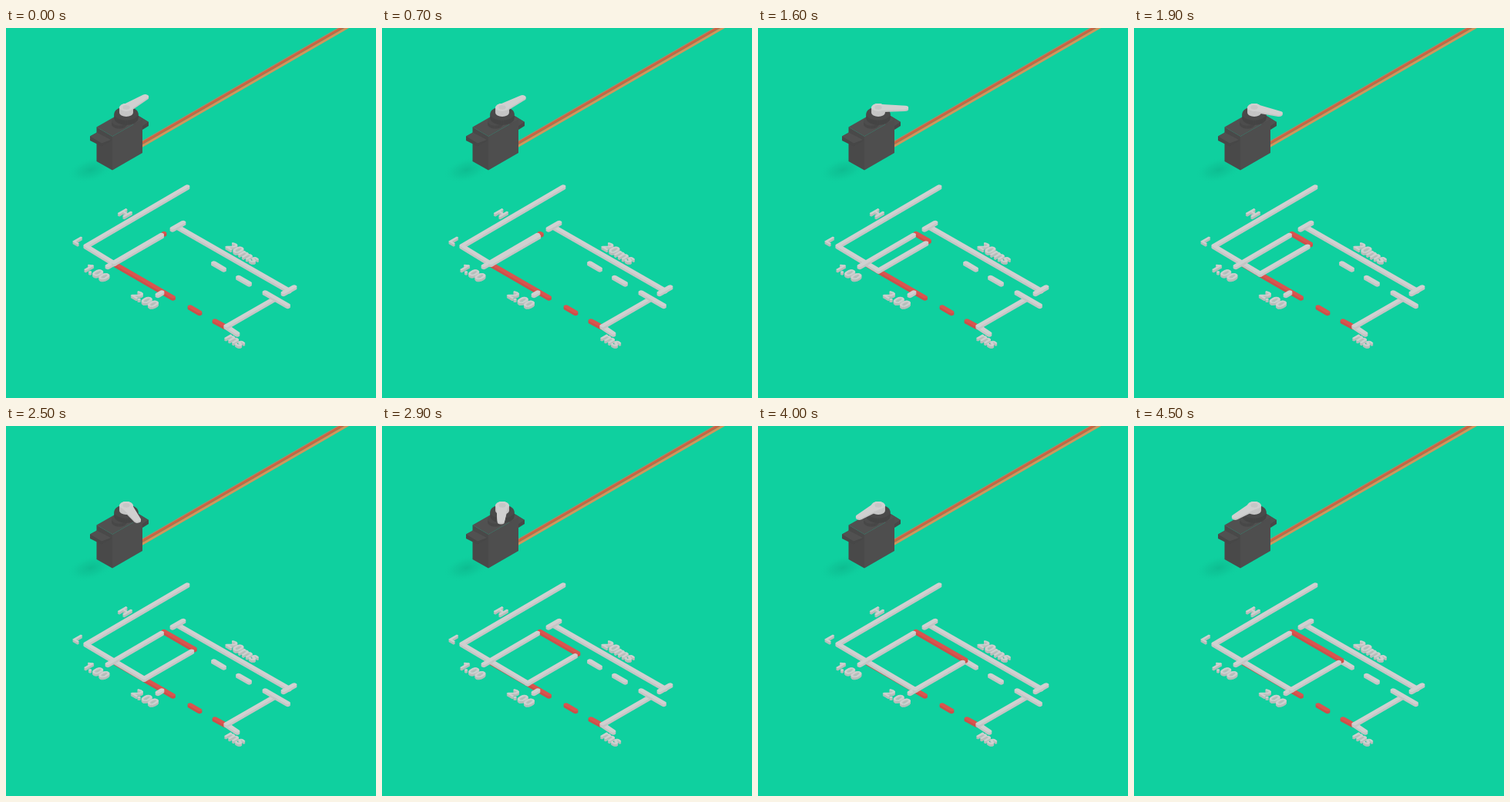
Recreate the animation shown at these times as an HTML page. Size 480 px wide and 480 px high, loop 4600 ms.

```html
<!DOCTYPE html>
<html lang="en">
<head>
<meta charset="utf-8">
<title>Servo pulse width</title>
<style>
  html, body { margin: 0; width: 100%; height: 100%; overflow: hidden; background: #0fd09f; }
  svg { display: block; width: 100vw; height: 100vh; }
  text { font: 600 16.5px "Open Sans", "Noto Sans", sans-serif; stroke-width: .9; stroke-linejoin: round; }
</style>
</head>
<body>
<svg viewBox="0 0 480 480">
  <defs>
    <radialGradient id="shade">
      <stop offset="0" stop-color="#0cb088" stop-opacity=".6"/>
      <stop offset=".5" stop-color="#0dbd91" stop-opacity=".4"/>
      <stop offset="1" stop-color="#0fd09f" stop-opacity="0"/>
    </radialGradient>
  </defs>
  <rect width="480" height="480" fill="#0fd09f"/>
  <ellipse cx="110" cy="184" rx="32" ry="16" fill="url(#shade)" transform="rotate(-15 110 184)"/>
  <g id="cable" fill="none"></g>
  <g id="servo"></g>
  <g id="horn"></g>
  <g id="chart"></g>
</svg>
<script>
const LOOP = 4600, STEP = 100;
const GRAY = ['#c5c5c5', '#d0d0d0'];
const RED = ['#cb504a', '#d9544f'];
const C = Math.sqrt(3) / 2;
const layer = id => document.getElementById(id);

// Repeat a shape downwards to give it height; the last copy is the top face.
function extrude(height, [side, top], shape) {
  let out = '';
  for (let dy = height; dy >= 0; dy--) out += shape(dy, dy ? side : top);
  return out;
}

// Screen point to ground plane coordinates.
const ground = (x, y) => [x / C / 2 - y, x / C / 2 + y];

function bar(x1, y1, x2, y2, colors = GRAY) {
  const [u1, v1] = ground(x1, y1), [u2, v2] = ground(x2, y2);
  return extrude(3, colors, (dy, color) =>
    `<path d="M${u1} ${v1}L${u2} ${v2 + 0.001}" stroke="${color}" stroke-width="5.3" stroke-linecap="round"
      transform="matrix(${C} -.5 ${C} .5 0 ${dy - 1.8})"/>`);
}

function label(x, y, text) {
  return extrude(3, ['#b9bdbb', '#d0d0d0'], (dy, color) =>
    `<text fill="${color}" stroke="${color}" transform="matrix(${C} .5 ${-C} .5 ${x} ${y + dy - 0.5})">${text}</text>`);
}

const poly = (points, color) => `<polygon points="${points}" fill="${color}"/>`;

function cylinder(x, y, rx, height, colors) {
  return extrude(height, colors, (dy, color) =>
    `<ellipse cx="${x}" cy="${y + dy}" rx="${rx}" ry="${rx * 0.58}" fill="${color}"/>`);
}

function drawStatic() {
  layer('cable').innerHTML = [
    [-3.4, 2, '#9c9070'], [-1.6, 2.6, '#d2603f'], [0.5, 1.4, '#a8704c'], [2.4, 3, '#cf965c']
  ].map(([dy, width, color]) =>
    `<path d="M174 ${152.3 + dy}L450 ${-7 + dy}" stroke="${color}" stroke-width="${width}"/>`).join('');

  layer('servo').innerHTML =
    poly('165,116 172,114 185,122 185,127 177,132 165,126', '#474747') +
    poly('165,116 172,114 185,122 177,127', '#505050') +
    poly('117.5,128.5 138,140.5 138,184.5 117.5,173', '#494949') +
    poly('138,140.5 177,118.5 177,162 138,184.5', '#4e4e4e') +
    poly('117.5,128.5 156,106.5 177,118.5 138,140.5', '#515151') +
    poly('109,140.5 118,135.5 137,146 124,153.5 109,146', '#474747') +
    poly('109,140.5 118,135.5 136,145 124,149.5', '#515151') +
    cylinder(147, 121, 10, 4, ['#484848', '#4d4d4d']) +
    cylinder(156, 111, 15.5, 6, ['#454545', '#4a4a4a']);
}

function hornPath(hub, tip, length) {
  const k = (hub - tip) / length, s = Math.sqrt(1 - k * k);
  return `M${hub * k} ${-hub * s}L${length + tip * k} ${-tip * s}` +
    `A${tip} ${tip} 0 0 1 ${length + tip * k} ${tip * s}` +
    `L${hub * k} ${hub * s}A${hub} ${hub} 0 1 1 ${hub * k} ${-hub * s}Z`;
}

const arm = hornPath(6.2, 3.7, 28.3);

function drawHorn(progress) {
  const plane = dy => `matrix(${C} -.5 ${C} .5 156 ${103 + dy}) rotate(${progress * 180})`;
  layer('horn').innerHTML =
    cylinder(156, 103, 8.8, 7, GRAY) +
    extrude(2, GRAY, (dy, color) =>
      `<path d="${arm}" fill="${color}" transform="${plane(dy)}"/>`) +
    cylinder(156, 103, 8.8, 0, GRAY) +
    '<ellipse cx="156" cy="103" rx="4.6" ry="2.7" fill="#c6c6c6"/>';
}

function drawChart(progress) {
  const dx = progress * 64, dy = progress * 37;
  const x = 140 + dx, y = 306 + dy;
  layer('chart').innerHTML =
    bar(104, 283.5, 235, 207) +
    bar(143, 308, 216.5, 350.5, RED) +
    bar(239, 363, 251, 370, RED) +
    bar(271, 381, 284, 388, RED) +
    bar(104, 284, x, y) +
    bar(197, 347, 202, 344) +
    bar(269.5, 306, 282.5, 313.5) +
    bar(301.5, 324.5, 315.5, 332.5) +
    bar(205, 267.5, 205 + dx, 267.5 + dy, RED) +
    bar(132, 310, 201.5, 269.5) +
    bar(x, y, x + 61.5, y - 35.5) +
    bar(286, 388, 300, 397.5) +
    bar(286, 388, 347, 352.8) +
    bar(336, 344, 365.5, 361) +
    bar(222, 258.5, 367, 341.5) +
    bar(216, 261.5, 230, 253.5) +
    bar(360, 345, 374, 337) +
    label(144, 240, 'H') +
    label(85.5, 276.5, 'L') +
    label(98, 311.5, '1.00') +
    label(161.5, 347, '2.00') +
    label(284, 284, '20ms') +
    label(282.5, 402, 'ms');
}

function sweep(time) {
  const u = Math.min(1, Math.max(0, (time - 390) / 3660));
  return u * u * (3 - 2 * u);
}

let shown = -1;
function render(now) {
  const time = Math.floor(now % LOOP / STEP) * STEP;
  if (time !== shown) {
    shown = time;
    drawHorn(sweep(time));
    drawChart(sweep(time));
  }
  requestAnimationFrame(() => render(performance.now() - start));
}

drawStatic();
const start = performance.now();
render(0);
</script>
</body>
</html>
```
